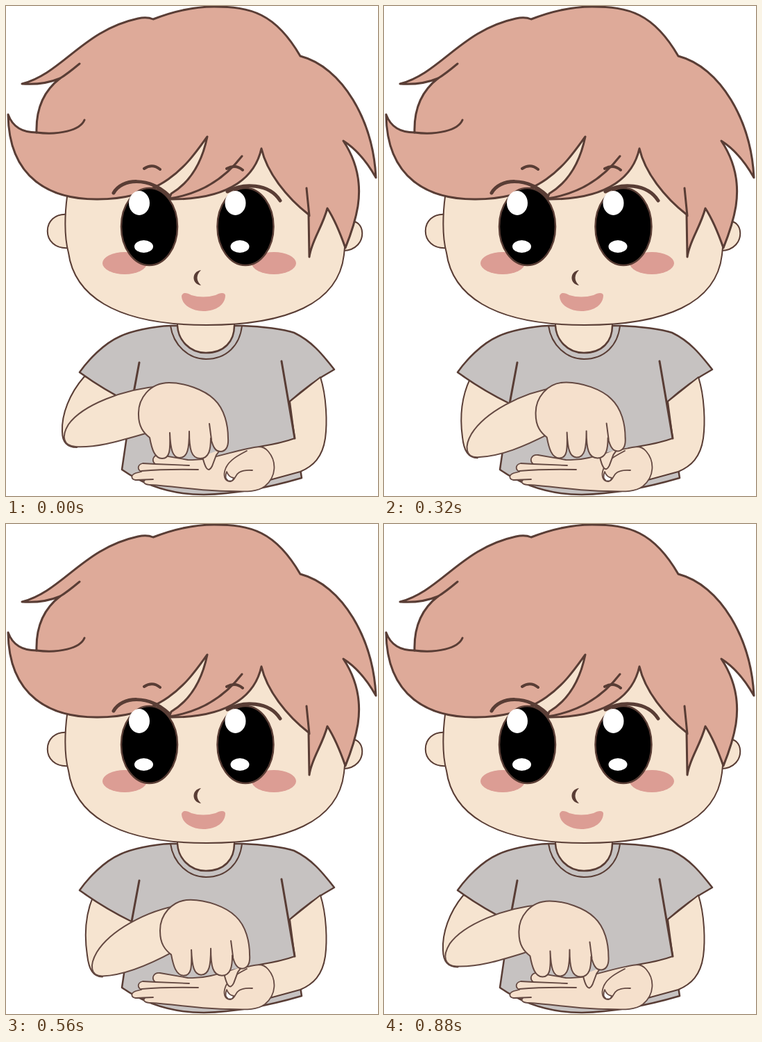
Recreate the animation shown at these times as an HTML page. Size 536 px wide and 705 px high, loop 900 ms.

```html
<!DOCTYPE html>
<html lang="en">
<head>
<meta charset="utf-8">
<title>Hand gesture</title>
<style>
  html, body { margin: 0; height: 100%; overflow: hidden; background: #fff; }
  svg { display: block; width: 100vw; height: 100vh; }
  .skin { fill: #f6e4d0; }
  .palm { fill: #f5e0cc; }
  .shirt { fill: #c6c2c1; }
  .hair { fill: #deaa99; }
  .pink { fill: #dc9d94; stroke: none; }
  .white { fill: #fff; stroke: none; }
  .line { fill: none; }
</style>
</head>
<body>
<svg viewBox="0 0 536 705" fill="none" stroke="#593d35" stroke-width="2" stroke-linecap="round" stroke-linejoin="round">
  <g id="body">
    <path class="skin" d="M247 440V480Q288 530 329 480V440Z"/>
    <path id="upperArm" class="skin"/>
    <path class="shirt" stroke-width="2.5" d="M237 460C210 461 180 468 165 475C140 486 118 510 106 527Q142 553 181 572L167 667C200 690 240 703 285 703C335 702 385 691 426 679L409 569Q440 541 473 523C455 500 440 482 415 470C400 465 370 461 340 460L329 460C329 482 315 499 288 499C264 499 248 480 247 460Z"/>
    <path d="M237 460C241 488 263 508 288 508C318 508 337 488 340 460"/>
    <path class="skin" d="M453 534C462 562 463 600 460 622C456 649 443 662 424 670L380 682L365 634Q397 629 416 622L409 569Z"/>
    <path d="M192 513L181 572M397 511L416 622" stroke-width="3"/>
  </g>

  <path id="forearm" class="skin" stroke="#644942"/>

  <g id="openHand" class="palm" stroke="#644942" stroke-width="1.8">
    <path d="M365 634C345 636 318 645 295 650Q278 654 262 653L222 646C212 645 209 654 215 659L197 658C189 660 189 667 195 670L187 672C179 675 180 681 187 682L200 682C196 686 201 689 209 689C245 691 280 698 322 698C350 699 362 699 373 691C390 677 390 655 378 641Q372 634 365 634Z"/>
    <path class="line" d="M215 659L264 661M195 669Q230 666 277 667M187 682L212 681"/>
    <path d="M347 640C336 646 323 652 317 664C312 675 315 684 323 684C331 683 329 675 336 671Q343 667 355 668"/>
    <path fill="#fff" d="M318 670Q314 680 320 683Q327 685 328 679Q321 678 318 670Z"/>
  </g>

  <g id="hand" class="palm" stroke="#644942">
    <path d="M283 648Q286 661 289 665Q293 670 297 662L303 646L309 638"/>
    <path d="M191 588C190 565 207 542 235 542C257 542 286 552 300 566C315 580 320 603 320 622C321 635 316 641 309 641C301 641 298 633 295 622C295 637 293 651 280 651C267 651 264 638 264 612C264 636 262 650 250 650C240 650 237 638 236 614C237 640 236 651 225 651C214 651 210 637 207 621C198 614 191 605 191 588Z"/>
    <path class="line" d="M293 601L296 624"/>
  </g>

  <g id="head">
    <path class="skin" d="M90 300C50 295 49 352 91 348M485 311C522 298 523 352 486 352"/>
    <path class="skin" d="M100 230C84 265 82 325 90 355C98 413 152 459 289 459C405 459 479 428 487 358C492 320 490 270 470 230L368 150H220Z"/>
    <path class="hair" stroke-width="3" d="M212 19C245 6 275 1 300 1C352 1 388 10 424 72C485 88 529 165 533 247C520 224 505 206 486 194C506 224 512 255 507 288Q503 313 489 348Q476 311 463 291C456 318 440 338 437 361L436 300C405 276 376 240 368 205C360 242 327 279 235 278L238 270C268 252 283 222 290 188C265 222 230 279 130 278C66 278 4 250 3 156C10 175 24 182 44 182C43 149 53 123 78 104Q54 114 23 112C81 97 111 35 190 18Q203 15 212 19Z"/>
    <path stroke-width="3" d="M44 182C76 186 107 179 113 164M106 83Q88 98 78 104M340 216C316 247 284 270 235 277M433 262L437 302"/>
    <path stroke-width="4" d="M199 234Q211 226 222 235M318 234Q331 227 341 236"/>
    <path class="pink" d="M253 417C255 411 261 413 267 416Q284 421 302 416C309 412 315 412 316 416C316 429 304 439 284 439C264 438 253 428 253 417Z"/>
    <path fill="#593d35" stroke="none" d="M281 380C267 382 267 400 281 402Q270 391 281 380Z"/>
    <ellipse class="pink" cx="171" cy="370" rx="32" ry="16"/>
    <ellipse class="pink" cx="386" cy="370" rx="32" ry="16"/>
    <g id="eye">
      <ellipse cx="206.5" cy="317.5" rx="40.5" ry="55.5" fill="#000" stroke-width="2.5"/>
      <ellipse class="white" cx="192" cy="283.5" rx="15" ry="17.5"/>
      <ellipse class="white" cx="198.5" cy="346" rx="13.5" ry="9"/>
    </g>
    <use href="#eye" x="138.5"/>
    <path stroke-width="5" d="M155 269C167 248 205 245 235 273M319 267C342 254 379 255 395 280"/>
  </g>
</svg>
<script>
  const LOOP = 900, STEP = 20, TURN = 460;
  const poses = {
    upperArm: [
      "M113 533C91 558 80 588 81 612C81 628 88 635 102 635L182 570L150 540Z",
      "M128 535C120 560 120 590 125 620C128 642 134 653 147 653L182 571L150 540Z"
    ],
    forearm: [
      "M222 547C170 551 110 574 90 602C79 620 83 633 100 634C135 636 172 623 212 612",
      "M260 546C207 555 158 587 140 617C129 636 130 653 148 652C180 650 215 634 249 613"
    ]
  };
  const byId = id => document.getElementById(id);

  function blend([from, to], k) {
    const ends = to.match(/\d+/g);
    let i = 0;
    return from.replace(/\d+/g, n => (+n + (ends[i++] - n) * k).toFixed(2) + " ");
  }

  function draw(now) {
    const t = Math.floor(now % LOOP / STEP) * STEP;
    const p = 1 - Math.abs(1 - t / TURN);
    const dip = 10.4 * p * (1 - p);
    for (const id in poses) {
      byId(id).setAttribute("d", blend(poses[id], p / 0.957));
      byId(id).setAttribute("transform", `translate(0 ${dip})`);
    }
    byId("hand").setAttribute("transform", `translate(${39.7 * p} ${dip - 4 * p})`);
  }

  const start = performance.now();
  (function tick() {
    draw(performance.now() - start);
    requestAnimationFrame(tick);
  })();
</script>
</body>
</html>
```
